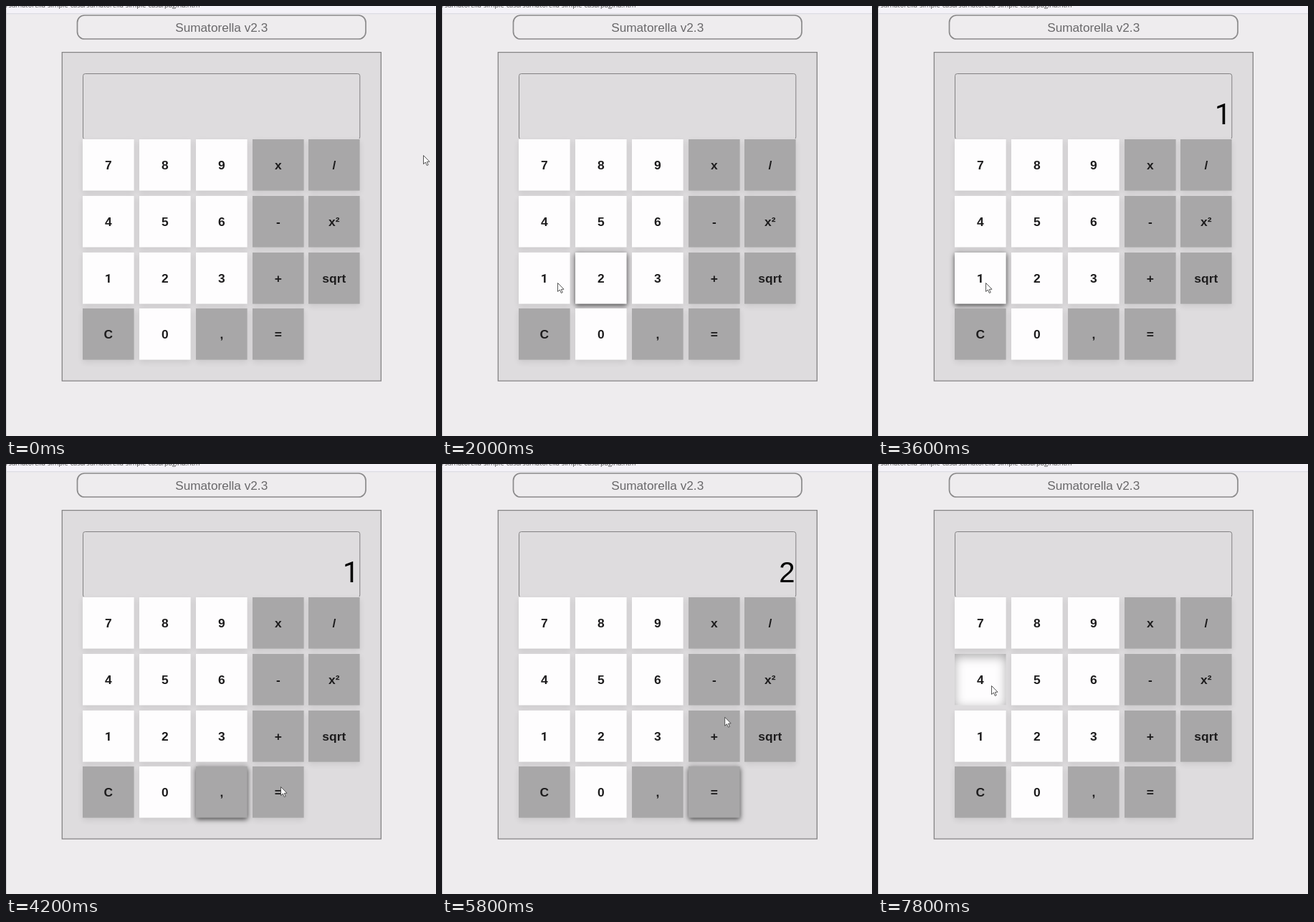
An HTML page with a canvas that plays this animation: 600 px wide and 600 px high, repeating every 8000 ms.

```html
<!DOCTYPE html>
<html lang="es">
<head>
<meta charset="utf-8">
<style>
  html, body { margin: 0; width: 100%; height: 100%; overflow: hidden; background: #eeecee; }
  canvas { display: block; width: 600px; height: 600px; }
</style>
</head>
<body>
<canvas id="stage"></canvas>
<script>
const canvas = document.getElementById('stage');
const ctx = canvas.getContext('2d');
const dpr = window.devicePixelRatio || 1;
canvas.width = canvas.height = 600 * dpr;

const LOOP = 8000, STEP = 200;
const SANS = '"Liberation Sans", Arial, sans-serif';
const PLAIN_ONE = 'Roboto, sans-serif'; // its "1" has no foot
const fontFor = text => text === '1' ? PLAIN_ONE : SANS;

const PITCH = 78.7, SIZE = 71.6;
const keys = ['7 8 9 x /', '4 5 6 - x²', '1 2 3 + sqrt', 'C 0 , ='].flatMap((row, r) =>
  row.split(' ').map((label, c) => ({
    label,
    x: Math.round(107.4 + c * PITCH),
    y: Math.round(186.1 + r * PITCH),
    fill: /\d/.test(label) ? '#fefdfe' : '#a8a7a8'
  })));

// The pointer glides to each stop and clicks there; a click sets the reading
const start = { x: 582, y: 208 };
const stops = [
  { go: 200, arrive: 2000, x: 161, y: 386, bend: -0.32, click: 2200, reading: '1' },
  { go: 2200, arrive: 2600, x: 363, y: 382, bend: 0, click: 3000, reading: '' },
  { go: 3000, arrive: 3400, x: 150, y: 386, bend: 0, click: 3400, reading: '1' },
  { go: 3600, arrive: 4200, x: 383, y: 450, bend: 0, click: 4400, reading: '2' },
  { go: 5600, arrive: 6060, x: 386, y: 226, bend: 0.045, click: 6400, reading: '' },
  { go: 6600, arrive: 7400, x: 158, y: 309, bend: 0, click: 7800, reading: '4' }
];

function pointerAt(t) {
  let from = start;
  for (const stop of stops) {
    if (t < stop.go) break;
    if (t < stop.arrive) {
      const k = (t - stop.go) / (stop.arrive - stop.go);
      const dx = stop.x - from.x, dy = stop.y - from.y;
      const bow = stop.bend * Math.sin(Math.PI * k);
      return { x: from.x + dx * k - dy * bow, y: from.y + dy * k + dx * bow };
    }
    from = stop;
  }
  return from;
}

function keyAt(t) {
  const { x, y } = pointerAt(t);
  return keys.find(k => x >= k.x && x < k.x + SIZE && y >= k.y && y < k.y + SIZE);
}

function readingAt(t) {
  return stops.reduce((text, s) => t > s.click ? s.reading : text, '');
}

function box(x, y, w, h, radius, line, color, fill) {
  ctx.beginPath();
  ctx.roundRect(x, y, w, h, radius);
  if (fill) { ctx.fillStyle = fill; ctx.fill(); }
  ctx.lineWidth = line;
  ctx.strokeStyle = color;
  ctx.stroke();
}

function bar(x, y, w, h, color) {
  ctx.fillStyle = color;
  ctx.fillRect(x, y, w, h);
}

function write(text, x, y, font, color, align) {
  ctx.font = font;
  ctx.fillStyle = color;
  ctx.textAlign = align;
  ctx.fillText(text, x, y);
}

function shadow(alpha, blur, dy) {
  ctx.shadowColor = `rgba(0,0,0,${alpha})`;
  ctx.shadowBlur = blur * dpr;
  ctx.shadowOffsetY = dy * dpr;
}

function drawInset(k) {
  ctx.save();
  ctx.beginPath();
  ctx.rect(k.x, k.y, SIZE, SIZE);
  ctx.clip();
  shadow(0.36, 15, 4);
  ctx.fillStyle = '#000';
  ctx.beginPath();
  ctx.rect(k.x - 40, k.y - 40, SIZE + 80, SIZE + 80);
  ctx.rect(k.x - 1, k.y - 1, SIZE + 2, SIZE + 2);
  ctx.fill('evenodd');
  ctx.restore();
}

function drawKey(k, { hovered, lifted, pressed }) {
  ctx.save();
  if (lifted) ctx.translate(0, -1.5);
  ctx.save();
  if (hovered) shadow(0.68, 7, 2);
  else if (!pressed) shadow(0.09, 8, 3);
  bar(k.x, k.y, SIZE, SIZE, k.fill);
  ctx.restore();
  if (pressed) drawInset(k);
  write(k.label, k.x + SIZE / 2, k.y + 42, `bold 17.4px ${fontFor(k.label)}`, '#1d1c1d', 'center');
  ctx.restore();
}

function drawPage() {
  bar(0, 0, 600, 600, '#eeecee');
  bar(0, 0, 600, 10, '#f4f2f8');
  bar(0, 10, 600, 1.3, '#dddce4');
  bar(0, 0, 1, 600, '#d0cfd2');
  write('/sumatorella-simple-casa/sumatorella-simple-casa/pagina.htm', 0, 2,
    '9.3px "Open Sans", sans-serif', '#444', 'left');

  box(99.5, 13, 402.5, 33, 10, 1.7, '#8b8a8b');
  write('Sumatorella v2.3', 300.7, 36, `17.2px ${SANS}`, '#69686a', 'center');
  box(78.3, 64.6, 445, 458.5, 0, 1.3, '#858485', '#dedcde');

  // The screen has no visible lower edge
  ctx.save();
  ctx.beginPath();
  ctx.rect(100, 90, 400, 95);
  ctx.clip();
  box(107.5, 94.5, 386.3, 91.5, 3, 1, '#828182');
  ctx.restore();
}

function drawPointer({ x, y }) {
  ctx.save();
  ctx.translate(x + 0.5, y + 0.5);
  const arrow = new Path2D('M0 0V12L2.8 9.5L4.8 14L6.7 13.2L4.8 8.9L8.5 8.7Z');
  ctx.fillStyle = '#fff';
  ctx.fill(arrow);
  ctx.lineWidth = 0.9;
  ctx.strokeStyle = '#444';
  ctx.stroke(arrow);
  ctx.restore();
}

function draw(t) {
  ctx.setTransform(dpr, 0, 0, dpr, 0, 0);
  drawPage();

  const reading = readingAt(t);
  write(reading, 492.5, 165, `40px ${fontFor(reading)}`, '#000', 'right');

  // The hover look trails the pointer by one step
  const now = keyAt(t), last = keyAt(t - STEP), older = keyAt(t - 2 * STEP);
  const clicking = stops.some(s => s.click === t);
  for (const k of keys) {
    const pressed = clicking && k === now;
    const hovered = k === last && !pressed;
    drawKey(k, { pressed, hovered, lifted: hovered && now === k && older === k });
  }
  drawPointer(pointerAt(t));
}

function tick() {
  const t = performance.now() % LOOP;
  draw(Math.floor(t / STEP) * STEP);
  requestAnimationFrame(tick);
}
tick();
</script>
</body>
</html>
```
